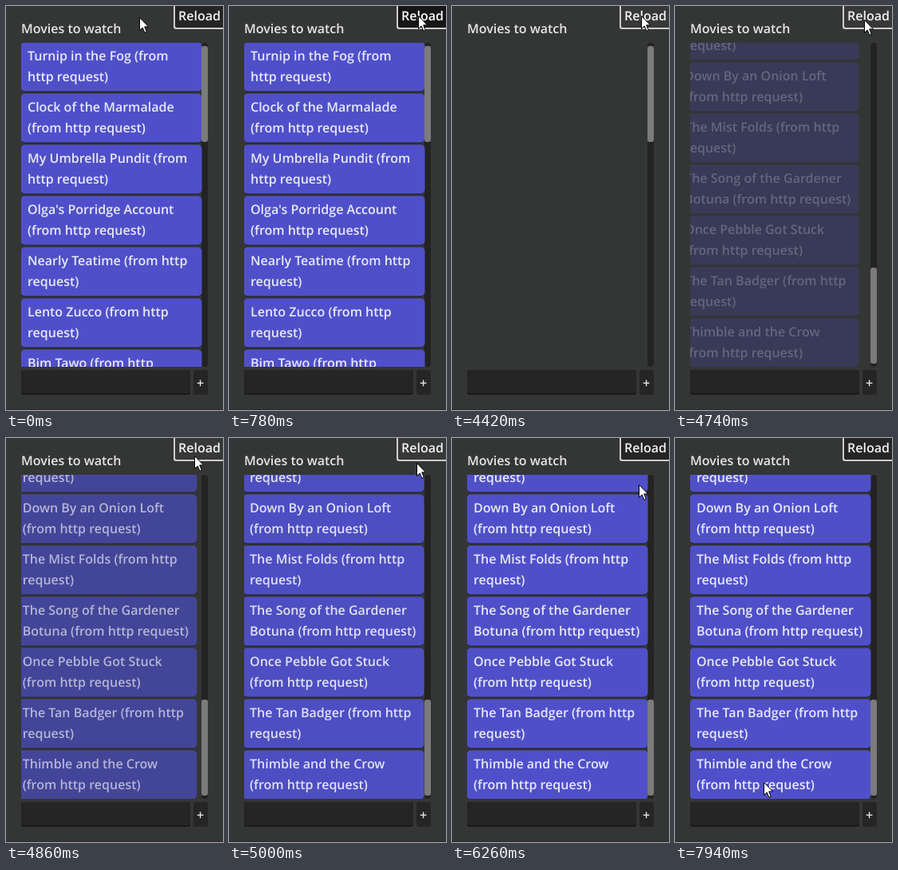
An HTML page with a canvas for the animation above (8000 ms loop, 272 by 505 pixels).

```html
<!DOCTYPE html>
<html lang="en">
<head>
<meta charset="utf-8">
<title>Movies to watch</title>
<style>
html, body { margin: 0; height: 100%; overflow: hidden; background: #343635; }
canvas { display: block; }
</style>
</head>
<body>
<canvas id="stage" width="272" height="505"></canvas>
<script>
const ctx = document.getElementById('stage').getContext('2d');
const LOOP = 8000;
const PANEL = '#242524';
const SOFT_WHITE = 'rgba(255,255,255,.875)';
const LIST = { x: 19, y: 46, width: 226, height: 405, pitch: 64, itemHeight: 60 };

// Each item is two wrapped lines, split at "|".
const topItems = [
  'Turnip in the Fog (from|http request)',
  'Clock of the Marmalade|(from http request)',
  'My Umbrella Pundit (from|http request)',
  "Olga's Porridge Account|(from http request)",
  'Nearly Teatime (from http|request)',
  'Lento Zucco (from http|request)',
  'Bim Tawo (from http|request)'
];
const bottomItems = [
  'Velvet Harbour (from http|request)',
  'Down By an Onion Loft|(from http request)',
  'The Mist Folds (from http|request)',
  'The Song of the Gardener|Botuna (from http request)',
  'Once Pebble Got Stuck|(from http request)',
  'The Tan Badger (from http|request)',
  'Thimble and the Crow|(from http request)'
];

const fadeSteps = [4460, 4540, 4620, 4740, 4860, 5000, 5120, 5160];

// Pointer positions: [time, x, y], each held until the next.
const pointerSteps = [
  [0, 167, 14], [500, 237, 12], [4740, 237, 17], [4860, 236, 22], [5000, 235, 31],
  ...glide(5400, 6140, 10, [235, 33], [235, 53], 1),
  ...glide(6260, 6820, 7, [234, 58], [191, 209], 1.3),
  [7100, 126, 392], [7360, 113, 422], [7940, 111, 430]
];

function glide(start, end, count, from, to, power) {
  return Array.from({ length: count }, (_, i) => {
    const p = i / (count - 1), k = p ** power;
    return [start + (end - start) * p, ...from.map((v, axis) => Math.round(v + (to[axis] - v) * k))];
  });
}

const easeInOutCubic = p => p < 0.5 ? 4 * p ** 3 : 1 - 4 * (1 - p) ** 3;

function box(x, y, width, height, radius, fill) {
  ctx.fillStyle = fill;
  ctx.beginPath();
  ctx.roundRect(x, y, width, height, radius);
  ctx.fill();
}

function text(string, x, baseline, color = SOFT_WHITE) {
  ctx.fillStyle = color;
  ctx.fillText(string, x, baseline);
}

function drawItems(items, firstY, shift, alpha) {
  ctx.save();
  ctx.beginPath();
  ctx.rect(LIST.x, LIST.y, LIST.width + 1, LIST.height);
  ctx.clip();
  ctx.globalAlpha = alpha;
  items.forEach((item, i) => {
    const x = LIST.x + shift, y = firstY + i * LIST.pitch;
    box(x, y + 1, LIST.width, LIST.itemHeight + 1, 5, 'rgba(0,0,0,.25)');
    // Half a pixel of bleed for the soft edge.
    box(x - 0.5, y - 0.5, LIST.width + 1, LIST.itemHeight + 1, 5, '#4f50c9');
    item.split('|').forEach((line, row) => text(line, x + 8, y + 22 + row * 26));
  });
  ctx.restore();
}

function drawList(t) {
  if (t >= 1240 && t < 4420) return;
  const atTop = t < 4460;
  box(245, LIST.y, 8, LIST.height, 4, '#222322');
  if (t < 1240) {
    drawItems(topItems, LIST.y, 0, 1);
  } else if (!atTop) {
    const stepTime = fadeSteps.findLast(s => s <= t);
    const k = easeInOutCubic((stepTime - 4460) / 700);
    drawItems(bottomItems, 7, -20 * (1 - k), k);
  }
  box(245, atTop ? 50 : 327, 8, 120, 3, '#7b7b7b');
}

function drawReload(t) {
  const hovered = t >= 500 && t < 5120;
  const pressed = t >= 780 && t < 1240;
  box(210, -4, 70, 33, 3, '#cccccc');
  box(212, -4, 70, 31, 2, pressed ? '#151615' : hovered ? '#373838' : PANEL);
  text('Reload', 216, 18, pressed ? '#fff' : '#f2f2f2');
}

function drawEntry() {
  box(19, 455, 212, 31, 3, '#191a19');
  box(19, 455, 212, 29, 3, PANEL);
  box(235, 455, 18, 31, 3, PANEL);
  text('+', 239, 477);
}

const arrow = new Path2D('M.5 .5V16.5L4.2 13L6.9 19.3L9.3 18.3L6.7 11.9H11.5Z');

function drawPointer(t) {
  const [, x, y] = pointerSteps.findLast(step => step[0] <= t);
  ctx.save();
  ctx.translate(x, y);
  ctx.fillStyle = '#fff';
  ctx.strokeStyle = '#000';
  ctx.lineWidth = 1;
  ctx.fill(arrow);
  ctx.stroke(arrow);
  ctx.restore();
}

function draw(t) {
  ctx.fillStyle = '#343635';
  ctx.fillRect(0, 0, 272, 505);
  ctx.fillStyle = '#282928';
  ctx.fillRect(0, 504, 272, 1);
  ctx.font = '600 16px "Open Sans", "Noto Sans", sans-serif';
  ctx.textRendering = 'geometricPrecision';
  text('Movies to watch', 19, 34);
  drawList(t);
  drawEntry();
  drawReload(t);
  drawPointer(t);
}

const start = performance.now();
function tick() {
  draw((performance.now() - start) % LOOP);
  requestAnimationFrame(tick);
}
tick();
</script>
</body>
</html>
```
